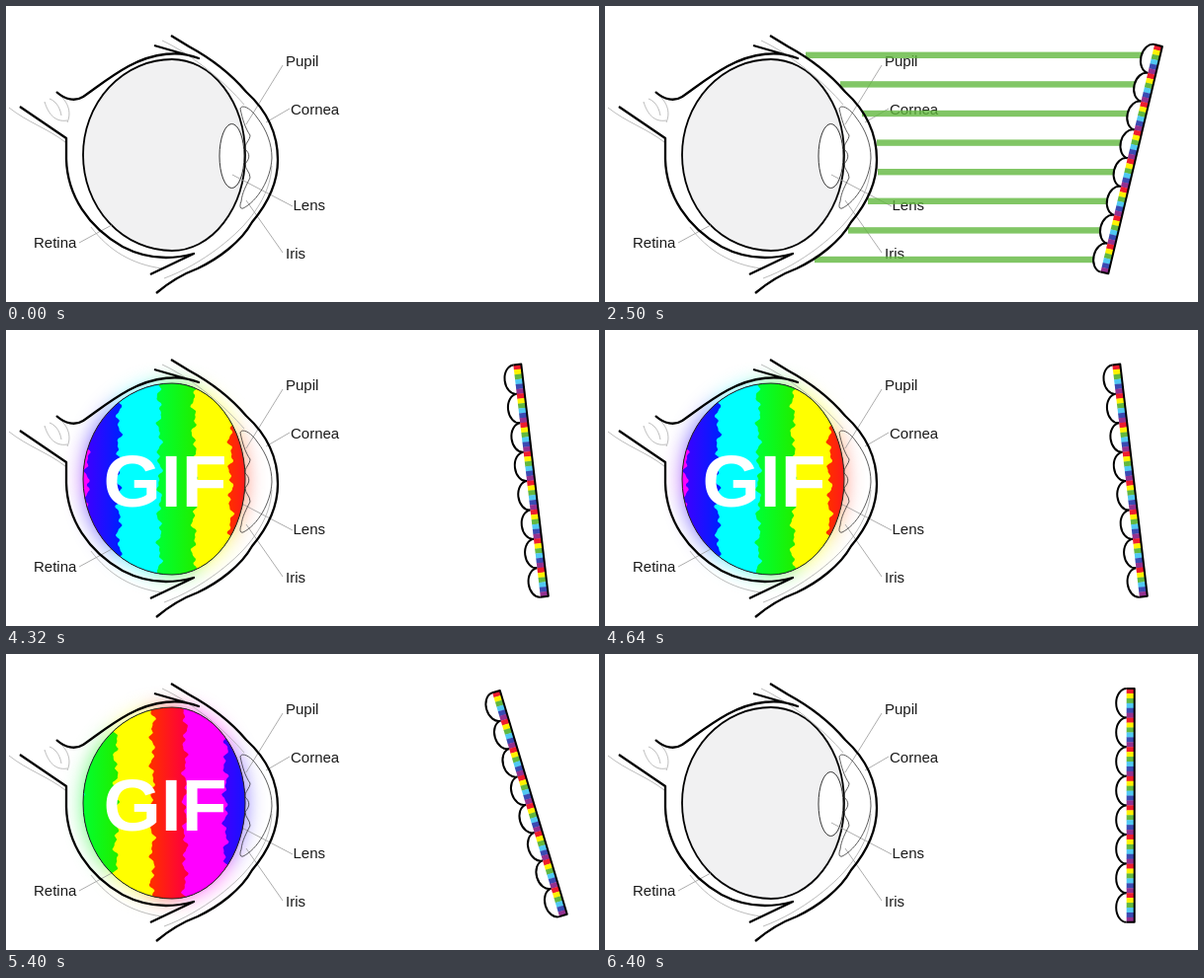
Recreate the animation shown at these times as an HTML page with a canvas. Size 600x300 px, loop 6.44 s.

```html
<!DOCTYPE html>
<html lang="en">
<head>
<meta charset="utf-8">
<title>Eye and lens sheet</title>
<style>
html, body { margin: 0; width: 100%; height: 100%; overflow: hidden; background: #fff; }
canvas { display: block; width: 600px; height: 300px; }
</style>
</head>
<body>
<canvas id="stage" width="600" height="300"></canvas>
<script>
const LOOP = 6440, TICK = 20;
const STEP = 20 / 6; // degrees of tilt per colour
const FONT = '"Liberation Sans", Arial, sans-serif';
const ctx = document.getElementById('stage').getContext('2d');
const layer = document.createElement('canvas');
layer.width = 600;
layer.height = 300;
const lc = layer.getContext('2d');

const INKS = ['#ee1c2e', '#fff200', '#62b83f', '#50c8f2', '#3a4ab2', '#93308f'];
// Left colour, right colour and width of each spectrum band.
const BANDS = [
  ['#3c00ff', '#001eff', 32], ['#00ffff', '#00ffff', 41], ['#00ff32', '#1ef000', 35],
  ['#ffff00', '#ffff00', 37], ['#ff2d00', '#ff003c', 33], ['#ff00ff', '#ff00ff', 41]
];
const CYCLE = BANDS.reduce((sum, band) => sum + band[2], 0);
const RAY_STARTS = [203, 238, 260, 275, 276, 266, 246, 212];
const LABELS = [
  ['Pupil', 283, 61, 280, 60, 243, 120],
  ['Cornea', 288, 110, 287, 104, 263, 118],
  ['Lens', 290.5, 207, 290, 203, 229, 171],
  ['Iris', 283, 256, 280, 250, 243, 197],
  ['Retina', 28, 245, 74, 240, 107, 222]
];

const BALL = new Path2D('M168 54 A74 97 0 0 1 168 248 A90 97 0 0 1 168 54 Z');
const HEAVY = new Path2D(
  'M167 30 L185 41 C207 53 227 68 243 87 C264 106 275 130 275 156 ' +
  'C275 180 265 200 249 219 C238 239 215 256 194 266 C178 272 165 280 152 291 ' +
  'M150 40 L195 53 C176 45 150 47 124 61 C104 72 90 84 78 92 C70 97 60 95 51 87 ' +
  'M14 102 L61 134 L61 155 C62 192 83 224 118 244 C141 256 165 258 190 251 L146 272');
const FAINT = new Path2D(
  'M158 35 C190 50 222 78 241 100 M3 103 C22 118 42 124 60 138 ' +
  'M86 224 C104 248 128 262 158 266 M160 276 C198 262 236 232 252 208 C263 192 268 178 269 162 ' +
  'M51 88 C62 95 67 107 62 118 M39 97 C43 110 50 118 62 116 M44 94 C52 97 55 105 56 111');
const IRIS = new Path2D(
  'M237 104 C239 99 248 104 254 113 C264 126 269 140 269 154 C268 176 254 198 240 205 ' +
  'C237 206 236 203 238 198 C239 189 243 182 247 174 C247 168 242 166 242 160 ' +
  'C247 154 247 150 242 145 C241 140 247 136 247 131 C242 124 239 114 237 104 Z');

function strokePath(path, color, width) {
  ctx.strokeStyle = color;
  ctx.lineWidth = width;
  ctx.stroke(path);
}

// Tilt of the sheet in colour steps: stepwise, then swinging, then settling.
function tiltAt(t) {
  if (t < 4000) return Math.floor((t - 500) / 500);
  const tick = Math.floor(t / 40) * 40;
  if (tick >= 5920) return 6 * (1 - (tick - 5920) / 480);
  const phase = ((tick - 4000) % 960) / 480;
  return 6 - 12 * (phase < 1 ? phase : 2 - phase);
}

function drawLeaders() {
  ctx.strokeStyle = '#999';
  ctx.lineWidth = 0.8;
  ctx.beginPath();
  for (const [, , , x1, y1, x2, y2] of LABELS) {
    ctx.moveTo(x1, y1);
    ctx.lineTo(x2, y2);
  }
  ctx.stroke();
}

function drawLabels() {
  ctx.fillStyle = '#1a1a1a';
  ctx.font = '15px ' + FONT;
  for (const [text, x, y] of LABELS) ctx.fillText(text, x, y);
}

function drawPlainBall() {
  ctx.fillStyle = '#f1f1f2';
  ctx.fill(BALL);
  strokePath(BALL, '#000', 1.8);
  const lens = new Path2D();
  lens.ellipse(228.5, 152, 12.5, 32.5, 0, 0, Math.PI * 2);
  ctx.fillStyle = '#fff';
  ctx.fill(lens);
  strokePath(lens, '#222', 0.9);
  drawLeaders();
}

function raggedEdge(x, y, seed) {
  return x + 1.5 * Math.sin(y * 0.47 + seed * 2.1) + 1.8 * Math.sin(y * 0.21 + seed * 4.7) +
    Math.sin(y * 0.83 + seed);
}

function paintBands(tilt) {
  const shift = 5.5 - 43.3 * tilt + 10 * Math.sin((tilt - 0.5) * Math.PI / 5.5);
  let x = ((shift % CYCLE) + CYCLE) % CYCLE - CYCLE;
  lc.clearRect(0, 0, 600, 300);
  lc.save();
  lc.clip(BALL);
  for (let n = 0; n < 18; n++) {
    const [from, to, width] = BANDS[n % 6];
    const fill = lc.createLinearGradient(x, 0, x + width, 0);
    fill.addColorStop(0, from);
    fill.addColorStop(1, to);
    lc.fillStyle = fill;
    lc.beginPath();
    lc.moveTo(300, 50);
    for (let y = 50; y <= 252; y += 2) lc.lineTo(raggedEdge(x, y, n % 6), y);
    lc.lineTo(300, 252);
    lc.fill();
    x += width;
  }
  lc.restore();
}

function drawColourBall(tilt) {
  paintBands(tilt);
  ctx.save();
  ctx.globalAlpha = 0.6;
  ctx.filter = 'blur(10px)';
  ctx.drawImage(layer, 0, 0);
  ctx.restore();
  drawLeaders();
  ctx.drawImage(layer, 0, 0);
  strokePath(BALL, '#222', 1);
  ctx.fillStyle = '#fff';
  ctx.font = 'bold 75px ' + FONT;
  ctx.fillText('GIF', 98.5, 178.5);
}

function drawRays(tilt) {
  const slope = Math.tan(tilt * STEP * Math.PI / 180);
  ctx.save();
  ctx.globalAlpha = 0.8;
  ctx.fillStyle = INKS[6 - tilt] || INKS[0];
  RAY_STARTS.forEach((x, i) => {
    const y = 49.8 + 29.6 * i;
    const end = 522 + (158.5 - y) * slope;
    ctx.fillRect(x, y - 3.2, end - x, 6.4);
  });
  ctx.restore();
}

function drawSheet(tilt) {
  const top = -123.5, pitch = 29.6, left = 3.2, width = 8;
  ctx.save();
  ctx.translate(524.5, 158.5);
  ctx.rotate(tilt * STEP * Math.PI / 180);
  ctx.strokeStyle = '#000';
  ctx.lineWidth = 2;
  for (let i = 0; i < 8; i++) {
    const y = top + i * pitch;
    ctx.beginPath();
    ctx.ellipse(left, y + pitch / 2, 10.5, pitch / 2, 0, Math.PI / 2, Math.PI * 1.5);
    ctx.fillStyle = '#fff';
    ctx.fill();
    ctx.stroke();
    INKS.forEach((ink, k) => {
      ctx.fillStyle = ink;
      ctx.fillRect(left, y + k * pitch / 6, width, pitch / 6 + 0.3);
    });
  }
  ctx.beginPath();
  ctx.moveTo(left, top);
  ctx.lineTo(left + width, top);
  ctx.lineTo(left + width, top + 8 * pitch);
  ctx.lineTo(left, top + 8 * pitch);
  ctx.stroke();
  ctx.restore();
}

function draw(t) {
  const tilt = tiltAt(t);
  const colour = t >= 4000 && t < 6400;
  ctx.fillStyle = '#fff';
  ctx.fillRect(0, 0, 600, 300);
  ctx.lineJoin = 'round';
  if (colour) drawColourBall(tilt);
  else drawPlainBall();
  strokePath(FAINT, '#aaa', 0.8);
  strokePath(IRIS, '#333', 0.8);
  drawLabels();
  if (t >= 500 && t < 4000) drawRays(tilt);
  strokePath(HEAVY, '#000', 2.3);
  if (t >= 500) drawSheet(tilt);
}

const start = performance.now();
function frame() {
  const t = (performance.now() - start) % LOOP;
  draw(Math.floor(t / TICK) * TICK);
  requestAnimationFrame(frame);
}
frame();
</script>
</body>
</html>
```
